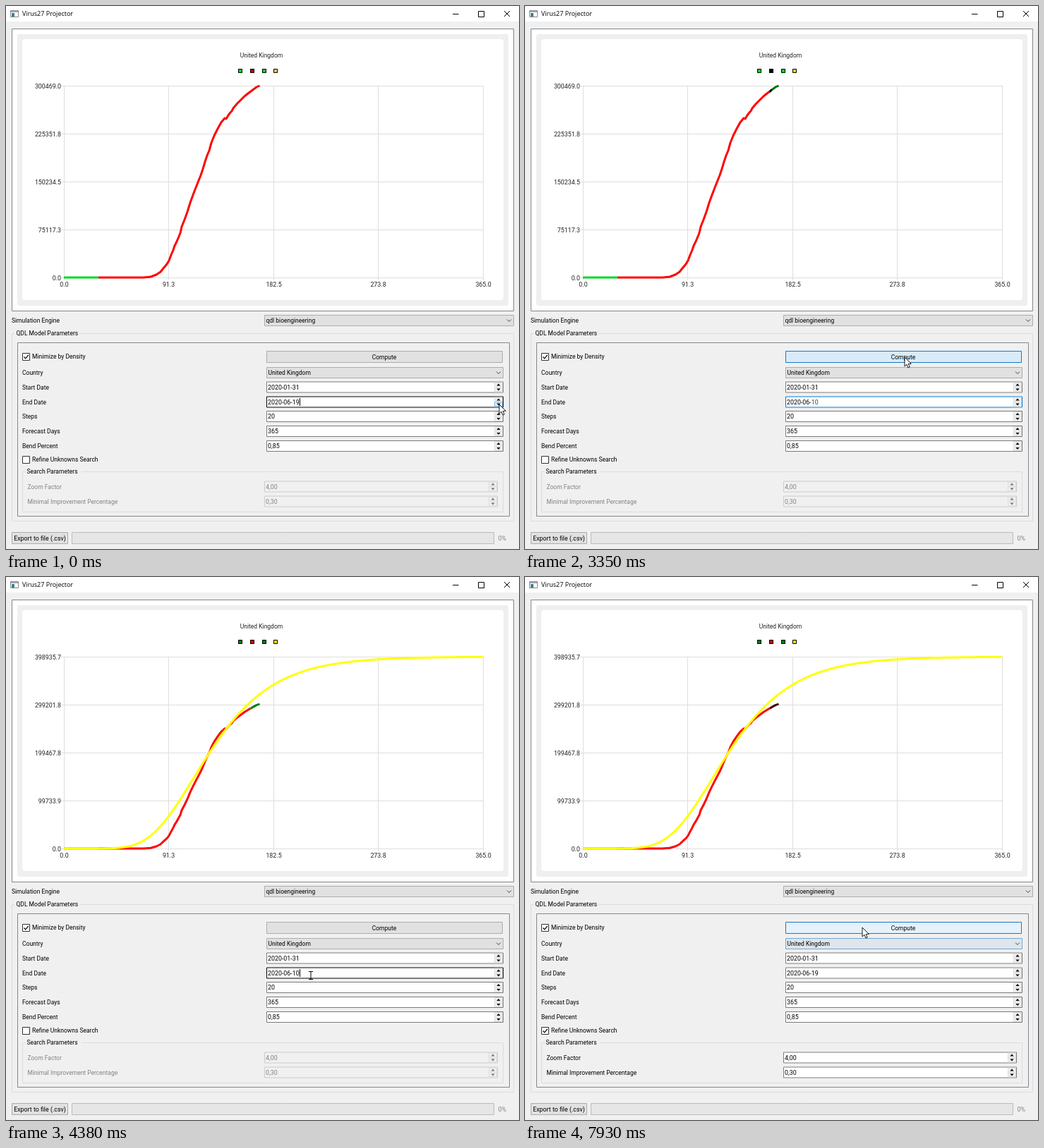
An HTML page with a canvas that plays this animation: 727x770 px, repeating every 8000 ms.

```html
<!DOCTYPE html>
<html lang="en">
<head>
<meta charset="utf-8">
<title>Virus27 Projector</title>
<style>
html, body { margin: 0; width: 100%; height: 100%; overflow: hidden; background: #f0f0f0; }
canvas { display: block; }
</style>
</head>
<body>
<canvas id="stage" width="727" height="770"></canvas>
<script>
const c = document.getElementById('stage').getContext('2d');
const LOOP = 8000, CONSOLE_ON = 3450, CONSOLE_OFF = 4380, REFINE_AT = 7230;
const UI = '8.5px Roboto, sans-serif', NUM = '8.85px Roboto, sans-serif';
const TITLE = '9px "Open Sans", sans-serif', MONO = '10.67px "Noto Sans Mono", monospace';
const BLUE = '#0078d7', LEFT = 82, RIGHT = 676.5, TOP = 113, BASE = 385;
const downs = [80, 610, 770, 930, 1160, 1330, 1480, 1640, 1790];
const ups = [5460, 5610, 5860, 6010, 6160, 6310, 6460, 6630, 6780];

// Reported cases, as x,y pairs on the chart scaled to 300469
const cases = [82,385, 195,385, 205,384, 213,381, 219,377, 223,372, 228,366, 231,361, 234,353,
  237,346, 239,340, 242,334, 247,322, 249,313, 253,303, 257,292, 261,279, 265,268, 270,255,
  276,240, 279,231, 282,221, 285,212, 288,205, 291,194, 295,184, 300,174, 305,165, 310,159,
  312,160, 315,155, 318,151, 320,149, 322,145, 327,139, 333,133, 338,128, 343,124, 347,121,
  351,118, 355,115, 359.5,113];

const log = `Range A1: [-1.00000E-01,  4.00000E-01]
Range B1: [ 3.00000E-01,  1.80000E+00]
Range B2: [ 8.75000E-01,  1.37500E+00]
Range K1: [ 2.50000E-02,  5.25000E-01]
Range K2: [-6.25000E-01,  1.87500E+00]
Build search set around  A1:  1.50000E-01 B1:  1.05000E+00 B2:  1.12500E+00 K1:  2.75000E-01 K2:  6.25000E-01 c
ompleted in  0.137280000 s.
 1.00000E+09  1
 7.24978E+00  6
 2.50765E+00  9267
 1.13238E+00  65905
 8.93617E-01  77812
 6.65816E-01  78253
 6.64089E-01  88565
 5.62363E-01  101795
 1.21444E-01  282563
 1.13578E-01  1643720
 2.99619E-02  2042051
Smallest ssrate is:  2.99619E-02
Fitting Improvement. Current ssrate:  2.99619E-02, Previous ssrate:  2.99617E-02, fitting improvement: -7.27360
E-06
Evaluating zoom completed in  60.495798900 s.
PROJECTED TOTAL CASES:  3.00955E+05
Build search set around  A1:  5.00000E-01 B1:  1.50000E+00 B2:  5.00000E-01 K1:  5.00000E-01 K2:  2.50000E+00 c
ompleted in  0.161000700 s.
 4.80074E+01  1
 4.67946E+01  527
 2.14664E+01  548
 1.68531E+01  11132
 1.31382E+01  21716
 9.91252E+00  32300
 8.46823E+00  42884
 7.69839E+00  53574
 6.64968E+00  53909
 5.34933E+00  64158
 2.41418E+00  226319
 1.24615E+00  258953
 7.36755E-01  453413
Smallest ssrate is:  7.36755E-01
PROJECTED TOTAL CASES:  3.18459E+05`.split('\n');

const count = (times, t) => times.filter(s => s <= t).length;

function fill(x0, y0, x1, y1, color) {
  c.fillStyle = color;
  c.fillRect(x0, y0, x1 - x0, y1 - y0);
}
function box(x0, y0, x1, y1, color, border) {
  if (color) fill(x0, y0, x1, y1, color);
  c.strokeStyle = border;
  c.lineWidth = 1;
  c.strokeRect(x0 + .5, y0 + .5, x1 - x0 - 1, y1 - y0 - 1);
}
function path(points, color, width = 1) {
  c.beginPath();
  for (let i = 0; i < points.length; i += 2) c.lineTo(points[i], points[i + 1]);
  c.strokeStyle = color;
  c.lineWidth = width;
  c.lineJoin = 'round';
  c.stroke();
}
// y is the middle of the capitals
function text(s, x, y, font = UI, color = '#000', align = 'left') {
  c.font = font;
  c.fillStyle = color;
  c.textAlign = align;
  c.fillText(s, x, y + 3.2);
}
function rounded(x0, y0, x1, y1, r, color) {
  c.fillStyle = color;
  c.beginPath();
  c.roundRect(x0, y0, x1 - x0, y1 - y0, r);
  c.fill();
}

function windowBar(height, title, y, titleX) {
  fill(0, 0, 727, height, '#fff');
  text(title, titleX, y, TITLE);
  path([633, y + .5, 641.5, y + .5], '#000');
  box(669, y - 4, 678, y + 5, null, '#000');
  path([706, y - 4, 714, y + 4], '#000');
  path([714, y - 4, 706, y + 4], '#000');
}

function combo(x0, y0, x1, y1, label, hot) {
  box(x0, y0, x1, y1, hot ? '#dfe5ea' : '#e1e1e1', hot ? '#6fa8d8' : '#adadad');
  const y = (y0 + y1) / 2;
  text(label, x0 + 2.5, y);
  path([x1 - 10, y - 1.5, x1 - 7, y + 1.5, x1 - 4, y - 1.5], '#444');
}

function check(y, on, label) {
  box(23, y - 5, 34, y + 6, '#fff', '#333');
  if (on) path([25.5, y + .5, 27.7, y + 2.8, 31.8, y - 2.2], '#000', 1.2);
  text(label, 37, y);
}

function spin(x0, x1, y, value, { off, border, hot = 0, press } = {}) {
  box(x0, y - 8, x1, y + 8, off ? '#f0f0f0' : '#fff', border || (off ? '#ccc' : '#7a7a7a'));
  text(value, x0 + 2, y, NUM, off ? '#838383' : '#000');
  for (const dir of [-1, 1]) {
    const x = x1 - 7, my = y + dir * 3.2, lit = hot === dir;
    box(x1 - 13, my - 3.5, x1 - 1, my + 3.5, lit ? (press ? '#b5d8f3' : '#dcedfa') : '#f0f0f0', lit ? '#7ab8e8' : '#dcdcdc');
    c.fillStyle = off ? '#777' : '#000';
    c.beginPath();
    c.moveTo(x - 2.7, my - dir * 1.2);
    c.lineTo(x + 2.7, my - dir * 1.2);
    c.lineTo(x, my + dir * 1.7);
    c.fill();
  }
}

function group(x0, y0, x1, y1, title, gap) {
  box(x0, y0, x1, y1, null, '#dcdcdc');
  fill(x0 + 5, y0, x0 + gap, y0 + 1, '#f0f0f0');
  text(title, x0 + 6.5, y0);
}

function curve(points, x0, x1, color) {
  if (x1 <= x0) return;
  c.save();
  c.beginPath();
  c.rect(x0, TOP - 1, x1 - x0, BASE - TOP + 4);
  c.clip();
  path(points, color, 3);
  c.restore();
}

function chart(t, day) {
  const done = t >= CONSOLE_OFF, max = done ? 398935.68 : 300469;
  box(8, 32, 720, 433, '#fff', '#828790');
  rounded(16, 40, 712, 425, 3, '#efefef');
  rounded(23, 47, 705, 417, 4, '#fff');
  text('United Kingdom', 362, 70, UI, '#222', 'center');

  const legend = done ? ['#008000', '#d00010', '#008000', '#ffe000']
    : t < 1330 ? ['#00d820', '#b80010', '#00d820', '#f0c468']
    : ['#00d820', '#000', '#00d820', '#dcdc28'];
  legend.forEach((color, i) => box(329 + Math.round(i * 16.8), 89, 335 + Math.round(i * 16.8), 95, color, '#000'));

  for (let k = 0; k < 5; k++) {
    const x = Math.floor(LEFT + (RIGHT - LEFT) * k / 4) + .5, y = BASE - 68 * k + .5;
    path([x, TOP, x, BASE + 4], '#dedede');
    path([LEFT - 4, y, RIGHT, y], '#dedede');
    text((max * k / 4).toFixed(1), 78, y, NUM, '#222', 'right');
    text((365 * k / 4).toFixed(1), x, 395, NUM, '#222', 'center');
  }

  const scale = 300469 / max;
  const real = cases.map((v, i) => i % 2 ? BASE - (BASE - v) * scale : v);
  const cut = Math.min(346.5 + (day - 10) * 1.627, 360.5);
  curve(real, LEFT, 131, '#00d820');
  curve(real, 131, done ? 346.5 : cut, '#ff0000');
  if (done) curve(real, 346.5, cut, '#400808');
  curve(real, cut, 361, done ? '#008000' : '#087010');
  if (!done && day < 18) curve(real, cut, cut + 3, '#000');
  if (done) {
    const fit = [];
    for (let x = LEFT; x <= RIGHT; x += 2) fit.push(x, BASE - 272 * Math.exp(-Math.exp(-.0163 * (x - 266))));
    curve(fit, LEFT, RIGHT, '#ffff00');
  }
}

// Stepped, eased pointer moves: start, end, steps, from, to
const moves = [
  [2510, 3050, 8, [699, 565], [538, 498]],
  [4460, 5140, 10, [432, 565], [697, 559]],
  [6855, 7160, 5, [697, 559], [28, 643]],
  [7470, 7930, 7, [28, 643], [478, 497]]
];
function pointer(t) {
  const started = moves.filter(m => m[0] <= t);
  if (t >= CONSOLE_OFF && started.length < 2) return moves[1][3];
  if (!started.length) return moves[0][3];
  const [t0, t1, n, from, to] = started.pop();
  const p = Math.min(1, (Math.floor((t - t0) / (t1 - t0) * (n - 1) + .001) + 1) / n);
  const e = p * p * (3 - 2 * p);
  return from.map((v, i) => v + (to[i] - v) * e);
}
function drawPointer([x, y]) {
  const beam = x > 370 && x < 690 && y > 533 && y < 632;
  c.save();
  c.translate(x, y);
  if (beam) {
    path([-3, -5.5, 3, -5.5], '#000');
    path([0, -5.5, 0, 5.5], '#000');
    path([-3, 5.5, 3, 5.5], '#000');
  } else {
    c.beginPath();
    for (const [px, py] of [[0, 0], [0, 13], [3, 10.3], [5, 15], [7.2, 14], [5.2, 9.5], [9.3, 9.3]]) c.lineTo(px, py);
    c.closePath();
    c.fillStyle = '#fff';
    c.fill();
    c.strokeStyle = '#000';
    c.lineWidth = .9;
    c.stroke();
  }
  c.restore();
}

function endDate(t, day, mouse) {
  const y = 561.5, press = [...downs, ...ups].some(s => t >= s && t < s + 75);
  const leaving = t >= 3280 && t < CONSOLE_ON, focus = !leaving && t < REFINE_AT;
  const hot = mouse[0] > 690 && mouse[1] > 553 && mouse[1] < 569 ? (mouse[1] < y ? -1 : 1) : 0;
  spin(369, 705, y, '2020-06-' + day, { border: leaving ? BLUE : focus ? '#000' : null, hot, press });
  c.font = NUM;
  const x0 = 371 + c.measureText('2020-06-').width, x1 = 371 + c.measureText('2020-06-' + day).width;
  const selected = (t >= downs[0] && t < 3280) || (t >= ups[0] && t < REFINE_AT);
  if (selected || leaving) {
    fill(x0, y - 5.5, x1 + .3, y + 5.5, selected ? BLUE : '#fff');
    text(day, x0, y, NUM, selected ? '#fff' : '#186018');
  } else if (t < downs[0] || (t >= CONSOLE_OFF && t < 5310)) {
    fill(416, y - 5.5, 417, y + 5.5, '#000');
  }
}

function simulator(t) {
  const day = 19 - count(downs, t) + count(ups, t), mouse = pointer(t), refine = t >= REFINE_AT;
  fill(0, 0, 727, 770, '#f0f0f0');
  windowBar(22, 'Virus27 Projector', 11, 23);
  box(6, 6, 18, 16, '#fff', '#888');
  fill(7, 7, 17, 9, '#aaa');
  fill(8, 10, 12, 15, '#3d7f96');
  chart(t, day);

  text('Simulation Engine', 8, 446);
  combo(366, 438, 720, 454, 'qdl bioengineering');
  group(8, 464, 720, 731, 'QDL Model Parameters', 96);
  box(16, 477, 714, 724, null, '#828790');
  check(497, true, 'Minimize by Density');

  const hover = mouse[0] > 369 && mouse[0] < 704 && mouse[1] > 488 && mouse[1] < 506;
  const face = !hover ? '#e1e1e1' : t >= 3280 && t < 3350 ? '#cce4f7' : t < CONSOLE_ON ? '#d8ebf9' : '#e5f1fb';
  box(369, 489, 704, 506, face, hover ? '#1c78c0' : '#adadad');
  text('Compute', 536, 497.5, UI, '#000', 'center');

  text('Country', 23, 520);
  combo(369, 512, 705, 528, 'United Kingdom', t >= 7780);
  text('Start Date', 23, 541);
  spin(369, 705, 540.5, '2020-01-31');
  text('End Date', 23, 562);
  endDate(t, day, mouse);
  [['Steps', '20'], ['Forecast Days', '365'], ['Bend Percent', '0,85']].forEach(([label, value], i) => {
    const y = 582 + i * 21;
    text(label, 23, y);
    spin(369, 705, y, value);
  });

  check(643, refine, 'Refine Unknowns Search');
  group(23, 660, 705, 718, 'Search Parameters', 84);
  [['Zoom Factor', '4,00'], ['Minimal Improvement Percentage', '0,30']].forEach(([label, value], i) => {
    const y = 681.5 + i * 21;
    text(label, 30.5, y, UI, refine ? '#000' : '#838383');
    spin(366, 697, y, value, { off: !refine });
  });

  box(8, 746, 88, 763, '#e1e1e1', '#adadad');
  text('Export to file (.csv)', 48, 754.5, NUM, '#000', 'center');
  box(93, 746, 692, 763, '#e6e6e6', '#bcbcbc');
  text('0%', 697.5, 754.5, NUM, '#838383');
  drawPointer(mouse);
}

function terminal(t) {
  fill(0, 0, 727, 770, '#000');
  windowBar(23, 'PowerShell 7 (x64)', 10, 22);
  fill(7, 5, 17, 15, '#1f3358');
  const shown = 25 + [0, 8, 11, 13, 15][count([3980, 4060, 4140, 4220], t)];
  log.slice(0, shown).forEach((line, i) => text(line, -.5, 29.5 + i * 12.82, MONO, '#ccc'));

  fill(715, 23, 727, 764, '#f0f0f0');
  fill(716, 109, 727, 122, '#cdcdcd');
  path([718, 32, 721, 29, 724, 32], '#444', 1.3);
  path([718, 754, 721, 757, 724, 754], '#444', 1.3);
  fill(0, 764, 332, 770, '#1b1b24');
  fill(332, 764, 727, 770, '#fff');
  fill(385, 764, 395, 770, '#f3d36b');
  fill(513, 764, 526, 770, '#e8e8e8');
  box(545, 767, 554, 772, '#fff', '#888');
  text('otăada', 400, 769, TITLE);
}

function frame(now) {
  const t = now % LOOP;
  (t >= CONSOLE_ON && t < CONSOLE_OFF ? terminal : simulator)(t);
  requestAnimationFrame(frame);
}
requestAnimationFrame(frame);
</script>
</body>
</html>
```
